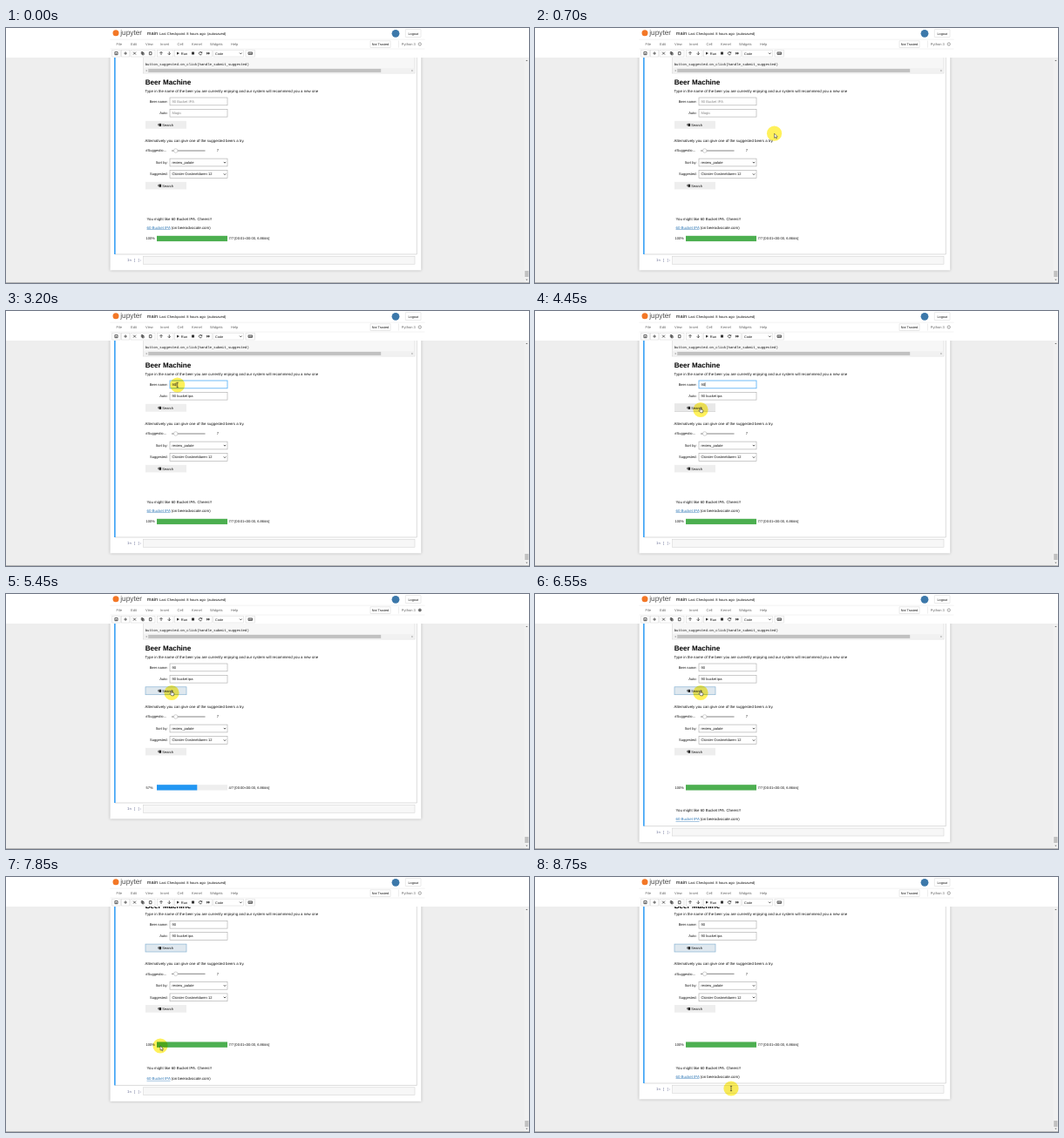
Write an HTML page that moves like this. It is 600 by 293 pixels and loops after 9000 ms.

```html
<!DOCTYPE html>
<html lang="en">
<head>
<meta charset="utf-8">
<title>Beer Machine notebook</title>
<style>
  html, body { margin: 0; width: 100%; height: 100%; overflow: hidden; background: #eee; }
  svg { display: block; width: 600px; height: 293px; }
  text { font: 4.06px "Liberation Sans", Arial, sans-serif; fill: #111; text-rendering: geometricPrecision; white-space: pre; }
  .body { font-size: 4.375px; }
  .small { font-size: 3.75px; }
  .mono { font: 3.98px "Liberation Mono", monospace; }
  .right { text-anchor: end; }
  .hint { fill: #858585; }
  .menu text { fill: #666; }
  .field { fill: #fff; stroke: #a8a8a8; stroke-width: .6; }
  .field.focus { stroke: #64b5f6; stroke-width: .9; }
  .code { fill: #f7f7f7; stroke: #cfcfcf; stroke-width: .5; }
  .button { fill: #eee; }
  .button.hover { fill: #e8e8e8; filter: drop-shadow(0 .7px .7px #0006); }
  .button.focus { fill: #dfe8ef; stroke: #8ab4d3; stroke-width: .7; }
  .outline { fill: #fff; stroke: #d4d4d4; stroke-width: .5; }
  .icons { fill: none; stroke: #333; stroke-width: .75; }
  .icons .solid { fill: #333; stroke: none; }
</style>
</head>
<body>
<svg viewBox="0 0 600 293">
  <defs>
    <g id="mug">
      <path d="M.6 .7h2.5v3.2h-2.5z" fill="#222"/>
      <path d="M.7 1.3h-1v1.5h1" fill="none" stroke="#222" stroke-width=".6"/>
    </g>
    <path id="chevron" d="M-1.2 -.6L0 .7L1.2 -.6" fill="none" stroke="#222" stroke-width=".75"/>
    <g id="search">
      <use href="#mug" x="175" y="-2.2"/>
      <text x="179.3" y="1.4">Search</text>
    </g>
  </defs>

  <rect width="600" height="293" fill="#eee"/>

  <g id="page">
    <rect id="paper" x="119.5" y="20" width="356.8" fill="#fff" style="filter:drop-shadow(0 0 1.5px #0004)"/>
    <path id="cellEdge" fill="none" stroke="#b5b5b5" stroke-width=".5"/>
    <rect id="cellBar" x="124" y="20" width="1.7" fill="#42a5f5"/>

    <rect class="code" x="157.7" y="20" width="311.3" height="32"/>
    <text class="mono" x="159.7" y="42.9">button_suggested.on_click(handle_submit_suggested)</text>
    <rect x="158" y="46.4" width="310.7" height="5" fill="#f1f1f1"/>
    <rect x="163.2" y="46.9" width="267" height="4" fill="#c1c1c1"/>
    <path d="M161.5 47.9v2l-1.2 -1zM465.6 47.9v2l1.2 -1z" fill="#777"/>

    <text x="159.7" y="65.4" style="font-size:8.1px;font-weight:bold;fill:#000">Beer Machine</text>
    <text class="body" x="159.5" y="74.1">Type in the name of the beer you are currently enjoying and our system will recommend you a new one</text>

    <text class="right" x="185.6" y="85.7">Beer name:</text>
    <rect id="nameField" class="field" x="188" y="80" width="66" height="8.8"/>
    <text id="nameText" x="190.5" y="85.8"></text>
    <path id="caret" d="M0 82.2v4.4" stroke="#111" stroke-width=".5"/>

    <text class="right" x="185.6" y="99.2">Auto:</text>
    <rect class="field" x="188" y="93.3" width="66" height="8.8"/>
    <text id="autoText" x="190.5" y="99.2"></text>

    <rect id="searchButton" class="button" x="160" y="106.8" width="47" height="8.9"/>
    <use href="#search" y="111.3"/>

    <text class="body" x="159.5" y="130.8">Alternatively you can give one of the suggested beers a try.</text>

    <text x="160.3" y="142.4">#Suggestio…</text>
    <path d="M190 141h38.5" stroke="#777" stroke-width=".9"/>
    <circle cx="194.7" cy="141" r="2.3" fill="#fff" stroke="#a8a8a8" stroke-width=".5"/>
    <text x="241.7" y="142.4">7</text>

    <text class="right" x="185.6" y="156">Sort by:</text>
    <rect class="field" x="188" y="150.1" width="66" height="8.8"/>
    <text x="190.5" y="156">review_palate</text>
    <use href="#chevron" x="251" y="154.5"/>

    <text class="right" x="185.6" y="169.4">Suggested:</text>
    <rect class="field" x="188" y="163.6" width="66" height="8.8"/>
    <text x="190.5" y="169.4">Cloister Oostmeldaren 12</text>
    <use href="#chevron" x="251" y="168"/>

    <rect class="button" x="160" y="176.8" width="47" height="8.6"/>
    <use href="#search" y="181.1"/>

    <g id="message">
      <text class="body" x="161.5" y="220.7">You might like 60 Bucket IPA. Cheers!!</text>
      <text id="link" class="body" x="161.5" y="230.5"><tspan fill="#337ab7" text-decoration="underline">60 Bucket IPA</tspan> (on beeradvocate.com)</text>
    </g>
    <g id="progress">
      <text id="percent" x="160.5" y="243.4"></text>
      <rect x="173" y="238.8" width="81" height="6.3" fill="#eee"/>
      <rect id="fill" x="173" y="238.8" height="6.3"/>
      <text id="rate" x="255.5" y="243.4"></text>
    </g>

    <g id="nextCell">
      <text class="mono" x="139" y="268.4" style="fill:#5f658f">In [ ]:</text>
      <rect class="code" x="157.7" y="262.4" width="311.3" height="8.9"/>
    </g>
  </g>

  <g id="header">
    <rect width="600" height="34" fill="#fff" style="filter:drop-shadow(0 .4px .6px #0004)"/>
    <circle cx="126" cy="5.8" r="3.5" fill="#f37726"/>
    <text x="131.2" y="8.2" style="font-size:8.3px;fill:#4e4e4e">jupyter</text>
    <text x="161.8" y="7.8" style="font-size:5.65px">main</text>
    <text x="176" y="7.7">Last Checkpoint: 8 hours ago</text>
    <text x="231" y="7.7">(autosaved)</text>
    <circle cx="447" cy="6.3" r="4.4" fill="#3c78aa"/>
    <rect class="outline" x="458.3" y="1.6" width="17.7" height="9" rx=".6"/>
    <text class="small" x="461.5" y="7.5">Logout</text>

    <path d="M119.5 13.2h361M119.5 24h361" stroke="#e7e7e7" stroke-width=".5"/>
    <g class="menu">
      <text x="126.5" y="20">File</text><text x="143" y="20">Edit</text>
      <text x="160" y="20">View</text><text x="177" y="20">Insert</text>
      <text x="196.5" y="20">Cell</text><text x="213" y="20">Kernel</text>
      <text x="234" y="20">Widgets</text><text x="258" y="20">Help</text>
      <text x="453.8" y="20">Python 3</text>
    </g>
    <rect class="outline" x="418" y="14.9" width="23" height="7.4"/>
    <text class="small" x="419.8" y="20">Not Trusted</text>
    <path d="M450.5 14.5v8" stroke="#ddd" stroke-width=".5"/>
    <circle id="kernel" cx="474.8" cy="18.5" r="1.6" stroke="#666" stroke-width=".6"/>

    <g class="outline">
      <rect x="121.8" y="25.2" width="9.4" height="7.8"/>
      <rect x="132.4" y="25.2" width="9.4" height="7.8"/>
      <rect x="143" y="25.2" width="28" height="7.8"/>
      <rect x="173.4" y="25.2" width="18.6" height="7.8"/>
      <rect x="193.4" y="25.2" width="43.2" height="7.8"/>
      <rect x="238" y="25.2" width="34.5" height="7.8"/>
      <rect x="275" y="25.2" width="10.5" height="7.8"/>
    </g>
    <g class="icons">
      <path d="M124.9 27.5h3.2v3.2h-3.2zM125.6 29.6h1.8M137.1 27.3v3.6M135.3 29.1h3.6"/>
      <path d="M146 27.6l3 3M146 30.6l3 -3M155.3 27.5h1.8v2.4h-1.8zM156.4 28.6h1.8v2.2h-1.8zM164.4 27.6h2.6v3.1h-2.6z"/>
      <path d="M178 31v-3.5M176.4 29l1.6 -1.6l1.6 1.6M187.3 27.2v3.5M185.7 29.2l1.6 1.6l1.6 -1.6"/>
      <path d="M224.4 28.1a1.7 1.7 0 1 0 .3 1.5M224.8 27.2v1.3h-1.4M278 27.9h4.5v2.5h-4.5zM278.6 29.2h3.4"/>
      <path class="solid" d="M196 27.4l3 1.7l-3 1.7zM213 27.6h3v3h-3zM230.2 27.5l1.9 1.6l-1.9 1.6zM232.1 27.5l1.9 1.6l-1.9 1.6z"/>
    </g>
    <text x="200.8" y="30.5">Run</text>
    <text x="240" y="30.5" class="small">Code</text>
    <use href="#chevron" x="269.3" y="29.2"/>
  </g>

  <g>
    <rect x="594.7" y="34.5" width="5.3" height="258" fill="#f1f1f1"/>
    <rect id="thumb" x="595.2" y="279" width="4.3" height="7" fill="#c1c1c1"/>
    <path d="M596.2 38h2.4l-1.2 -1.3zM596.2 288.7h2.4l-1.2 1.3z" fill="#666"/>
    <path d="M0 292.5h600" stroke="#aaa" stroke-width=".8"/>
  </g>

  <g id="pointer">
    <circle r="8.6" fill="#ffef3e" opacity=".85" style="mix-blend-mode:multiply"/>
    <path id="arrow" d="M0 0v5.2l1.2 -1.1l.9 1.9l.8 -.4l-.9 -1.8h1.7z" fill="#fff" stroke="#111" stroke-width=".45"/>
    <path id="beam" d="M-1.1 -2.7h2.2M0 -2.7v5.4M-1.1 2.7h2.2" fill="none" stroke="#222" stroke-width=".6"/>
    <path id="hand" d="M-.7 -2.2q.6 -.7 1.1 0v2l2 .4q.6 .2 .5 .9l-.5 2.2h-2.6l-1.7 -2.3q.2 -.9 1.2 -.1z" fill="#fff" stroke="#111" stroke-width=".5"/>
  </g>
</svg>
<script>
const LOOP = 9000;
const SCROLL = 29.7;
const el = Object.fromEntries([...document.querySelectorAll("[id]")].map(e => [e.id, e]));

// Pointer stops: time, x, y
const path = [
  [300, 577, 163], [850, 208, 112], [1150, 196.7, 85], [4150, 196.7, 85], [4420, 190, 113.5],
  [7500, 190, 113.5], [7850, 177, 194], [8150, 184, 229], [8450, 197, 236], [8700, 225, 243]
];
const shapes = [[0, "arrow"], [1050, "beam"], [4250, "hand"], [7550, "arrow"], [8100, "hand"], [8500, "beam"]];

const clamp = v => Math.min(1, Math.max(0, v));
const smooth = v => { v = clamp(v); return v * v * (3 - 2 * v); };
const show = (e, on) => e.setAttribute("visibility", on ? "visible" : "hidden");
const shift = (e, x, y) => e.setAttribute("transform", `translate(${x} ${y})`);
const within = (t, from, to) => t >= from && t < to;

function pointerAt(t) {
  const i = path.findIndex(p => p[0] > t);
  if (i < 0) return path.at(-1).slice(1);
  if (i === 0) return path[0].slice(1);
  const [t0, x0, y0] = path[i - 1], [t1, x1, y1] = path[i];
  const k = smooth((t - t0) / (t1 - t0));
  return [x0 + (x1 - x0) * k, y0 + (y1 - y0) * k];
}

function drawForm(t, x, y) {
  const focused = within(t, 1150, 4850);
  const typed = t < 2850 ? "" : t < 2950 ? "9" : "90";
  el.nameField.classList.toggle("focus", focused);
  el.nameText.textContent = typed || "90 Bucket IPA";
  el.nameText.classList.toggle("hint", !typed);
  el.autoText.textContent = t < 2950 ? "Magic" : "90 bucket ipa";
  el.autoText.classList.toggle("hint", t < 2950);
  shift(el.caret, 190.6 + typed.length * 2.26, 0);
  show(el.caret, focused && Math.floor((t - 3200) / 500) % 2 === 0);

  const over = t >= 300 && t < 6600 && x > 160 && x < 207 && y > 106.8 && y < 115.7;
  el.searchButton.classList.toggle("hover", over && t < 4850);
  el.searchButton.classList.toggle("focus", t >= 4850);
}

function drawOutput(t) {
  const fresh = t >= 5100, answered = t >= 5650;
  const done = fresh ? Math.min(7, Math.floor((t - 5100) / 78)) : 7;
  const slack = within(t, 6700, 8450) ? 2.4 : 0;
  const bottom = (answered ? 266.7 : fresh ? 240 : 260) + slack;

  show(el.message, t < 5050 || answered);
  shift(el.message, 0, answered ? 29.7 : 0);
  shift(el.link, 0, slack);
  shift(el.progress, 0, fresh ? -19.6 : 0);
  el.percent.textContent = Math.round(done / 7 * 100) + "%";
  el.fill.setAttribute("width", 81 * done / 7);
  el.fill.setAttribute("fill", done < 7 ? "#2196f3" : "#4caf50");
  el.rate.textContent = done === 0 ? "0/7 [00:00<?, ?it/s]"
    : `${done}/7 [00:0${done < 7 ? 0 : 1}<00:00, 6.86it/s]`;
  el.kernel.setAttribute("fill", fresh && !answered ? "#666" : "#fff");

  el.paper.setAttribute("height", bottom - 1.6);
  el.cellBar.setAttribute("height", bottom - 20);
  el.cellEdge.setAttribute("d", `M125 ${bottom}H471.3V20`);
  shift(el.nextCell, 0, bottom - 260);
}

function draw(t) {
  const [x, y] = pointerAt(t);
  const scrolled = smooth((t - 6570) / 230);
  drawForm(t, x, y);
  drawOutput(t);
  shift(el.page, 0, -SCROLL * scrolled);
  shift(el.thumb, 0, scrolled);

  const shape = shapes.findLast(s => s[0] <= t)[1];
  shift(el.pointer, x, y);
  el.pointer.style.display = t < 300 ? "none" : "";
  for (const name of ["arrow", "beam", "hand"]) show(el[name], name === shape);
}

const start = performance.now();
function tick() {
  draw((performance.now() - start) % LOOP);
  requestAnimationFrame(tick);
}
tick();
</script>
</body>
</html>
```
